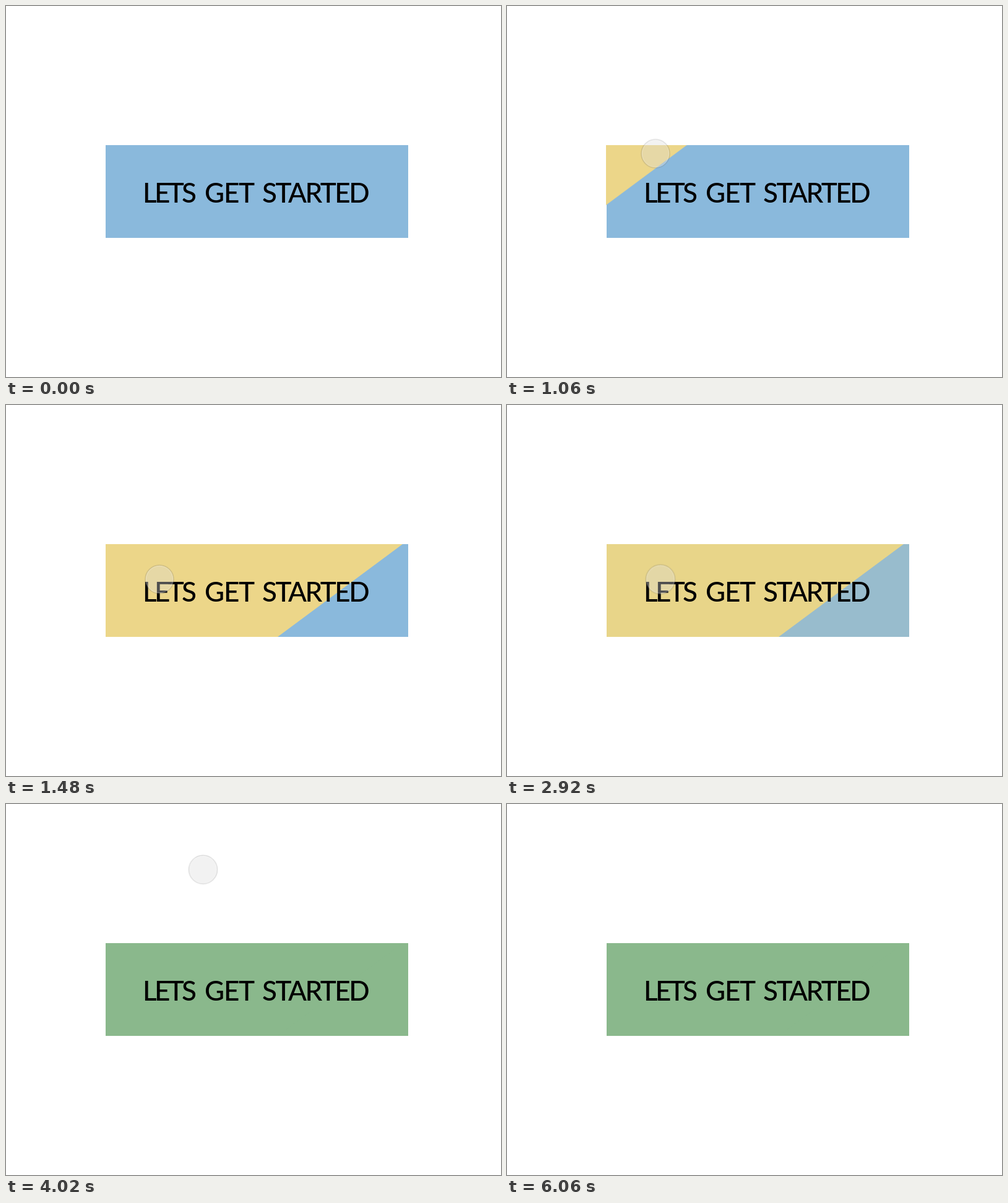
An HTML page that plays this animation: 800x600 px, repeating every 6.18 s.

```html
<!DOCTYPE html>
<html lang="en">
<head>
<meta charset="utf-8">
<title>Lets get started</title>
<style>
  html, body { margin: 0; width: 100%; height: 100%; overflow: hidden; background: #fff; }
  svg { display: block; width: 800px; height: 600px; }
  .base, .wipe, .sweep, .edge, .touch, .ring {
    animation-duration: 6180ms;
    animation-iteration-count: infinite;
    animation-timing-function: linear;
  }
  text { font: 500 44px Lato, "Open Sans", sans-serif; letter-spacing: -2.5px; fill: #000; }
  .tight { letter-spacing: -3.7px; }
  .loose { letter-spacing: -1.2px; }

  .base { fill: #8ab9dc; animation-name: base; }
  @keyframes base {
    0%, 46.76% { fill: #8ab9dc; }
    47.25% { fill: #98bcce; }
    48.7%, 100% { fill: #8ab88c; }
  }

  .wipe { fill: #ecd689; animation-name: wipe; }
  @keyframes wipe {
    0%, 46.76% { fill: #ecd689; }
    47.25% { fill: #ead689; animation-timing-function: cubic-bezier(.1, .6, .3, 1); }
    52.43%, 100% { fill: #8ab88c; }
  }

  .sweep { animation-name: sweep; }
  @keyframes sweep {
    0%, 15.57% { transform: translateX(-491px); animation-timing-function: ease; }
    23.72%, 100% { transform: none; }
  }

  /* the moving layer bleeds one pixel past the button's left side */
  .edge { fill: #fff; animation-name: edge; animation-timing-function: step-end; }
  @keyframes edge {
    0% { opacity: 1; }
    15.7% { opacity: 0; }
    23.72%, 100% { opacity: 1; }
  }

  .touch { animation-name: touch; }
  @keyframes touch {
    0%, 5.66% {
      transform: translate(191px, -25px);
      animation-timing-function: cubic-bezier(.333, .813, .667, .906);
    }
    23.95%, 62.62% {
      transform: translate(248px, 282px);
      animation-timing-function: cubic-bezier(.4, .15, .75, .7);
    }
    66.34%, 100% { transform: translate(373px, -30px); }
  }

  .ring { animation-name: press; }
  @keyframes press {
    0%, 38.83% { transform: none; }
    41.42%, 48.7% { transform: scale(1.03); }
    52.43%, 100% { transform: none; }
  }
</style>
</head>
<body>
<svg viewBox="0 0 800 600">
  <clipPath id="button"><rect x="160" y="225" width="490" height="150"/></clipPath>
  <rect class="base" x="161" y="225" width="489" height="150"/>
  <g clip-path="url(#button)">
    <g class="sweep"><path class="wipe" d="M-161 225H641L439 375H-161Z"/></g>
  </g>
  <rect class="edge" x="159" y="225" width="2" height="150"/>
  <text y="317.5"><tspan class="tight" x="221">LETS</tspan> <tspan class="loose" x="321">GET</tspan> <tspan x="414">STARTED</tspan></text>
  <g class="touch">
    <g class="ring">
      <circle r="23" fill="none" stroke="#777" stroke-opacity=".25" stroke-width="1.6"/>
      <circle r="22.3" fill="#dcdcdc" fill-opacity=".36"/>
      <circle r="21.6" fill="none" stroke="#fff" stroke-opacity=".25"/>
    </g>
  </g>
</svg>
</body>
</html>
```
